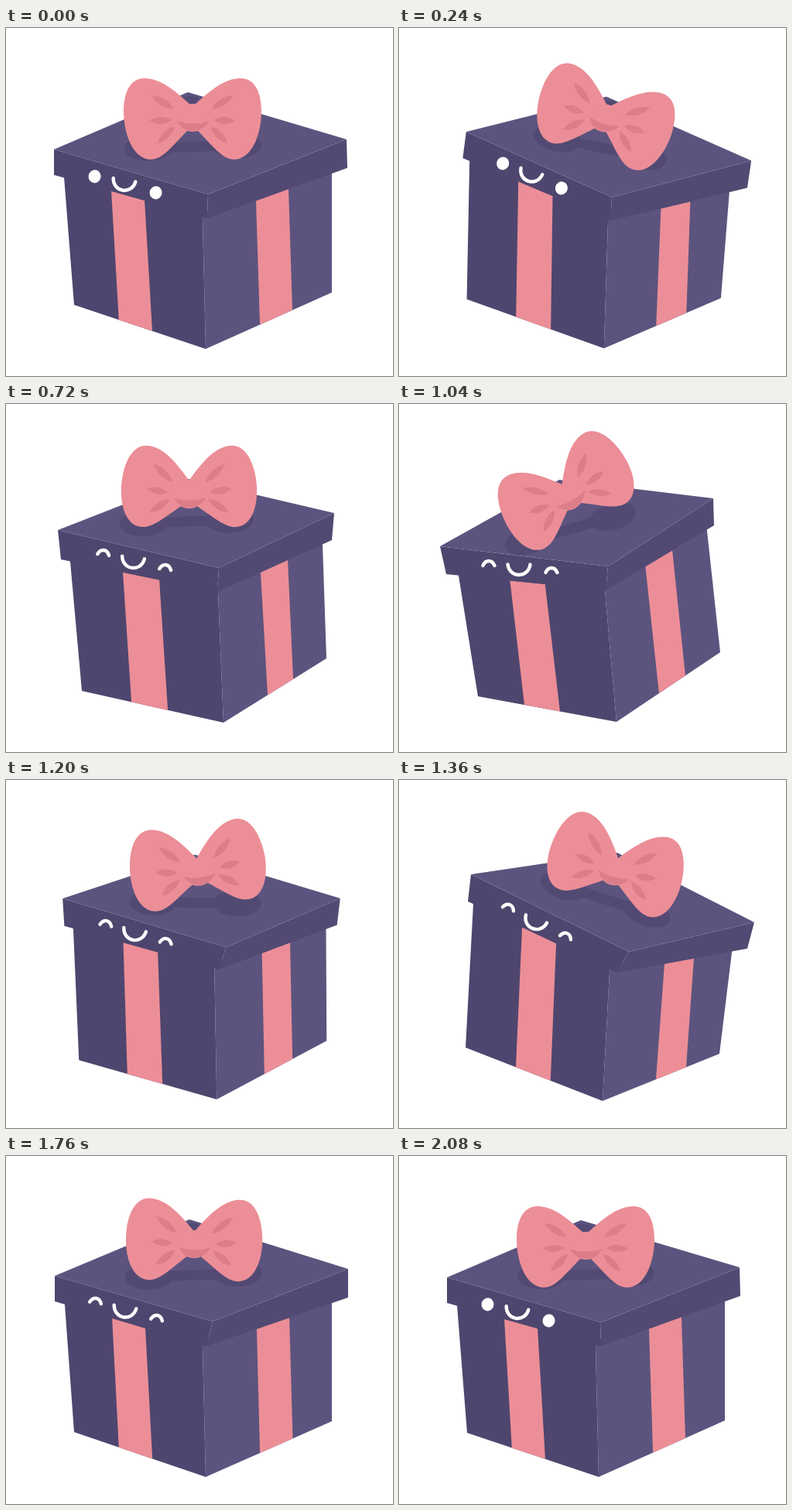
Animation, 500 px wide and 450 px high, one loop 2.4 s. Source, as an HTML page with a canvas:

```html
<!DOCTYPE html>
<html lang="en">
<head>
<meta charset="utf-8">
<title>Gift box</title>
<style>
  html, body { margin: 0; width: 100%; height: 100%; overflow: hidden; background: #fff; }
  canvas { display: block; }
</style>
</head>
<body>
<canvas id="stage" width="500" height="450"></canvas>
<script>
const ctx = document.getElementById('stage').getContext('2d');
const LOOP = 2400, STEP = 80, MOVE_END = 2080;
const SIDE = '#4e466e', FRONT = '#5c547e', RIM = '#524a73';
const PINK = '#ec8e97', FOLD = '#dc7d8a';

// body: top left, bottom left, bottom front, bottom right, top right, top front
// lid: left, back, right, front, then lower left, lower front, lower right
// left/right ribbon: percent along the lid edge (2) and the floor edge (2)
// face: both eyes; shade: both blobs; bow: knot x, y, tilt, raise in degrees
const rest = {
  at: 0,
  body: [75,193, 88,358, 258,415, 421,342, 421,190, 254,247],
  lid: [62,157, 235,83, 440,144, 261,215, 62,190, 260,246, 441,181],
  left: [37.4,59.1, 34,59.4], right: [34.8,58, 43,68.7],
  face: [115,189, 194,210], shade: [184,155, 299,152], bow: [241,116, 0,0]
};
const poses = [rest, {
  at: 480,
  body: [103,160, 90,350, 275,413, 411,350, 427,226, 285,250],
  lid: [103,122, 288,96, 460,187, 287,220, 97,158, 285,250, 450,221],
  left: [38.3,62.8, 37.3,62.7], right: [38.8,59.4, 45.6,71.3],
  face: [150,163, 224,201], shade: [215,135, 322,174], bow: [279,117, 29,7]
}, {
  at: 720,
  body: [83,204, 98,371, 281,412, 414,329, 409,182, 274,243],
  lid: [67,163, 236,97, 424,141, 275,212, 71,201, 273,243, 421,176],
  left: [39.6,62.9, 35,60.7], right: [37.8,61.5, 42.9,67.7],
  face: [126,192, 206,211], shade: [178,154, 289,150], bow: [236.5,117, 0,12]
}, {
  at: 1040,
  body: [77,222, 102,378, 281,411, 415,321, 398,164, 266,241],
  lid: [53,184, 207,98, 406,122, 270,210, 61,220, 267,241, 407,157],
  left: [40,62, 33.5,59.2], right: [36.7,61.5, 41,66.4],
  face: [116,206, 197,215], shade: [167,177, 276,146], bow: [219,119, -29,10]
}, {
  at: 1360,
  body: [96,160, 86,346, 263,415, 414,354, 430,223, 272,248],
  lid: [93,122, 282,94, 459,184, 297,222, 89,157, 282,249, 450,218],
  left: [36.3,59.1, 36.7,62], right: [36.3,58.9, 45.7,71.5],
  face: [142,164, 216,201], shade: [213,137, 321,172], bow: [278,118, 17,11]
}, {
  at: 1760,
  body: [76,193, 88,357, 258,415, 421,343, 421,192, 254,247],
  lid: [63,155, 237,82, 442,146, 267,214, 63,188, 259,246, 442,183],
  left: [37.8,59.7, 34,59.5], right: [35.5,58.5, 43,69],
  face: [116,187, 195,209], shade: [185,156, 300,152], bow: [243,114, 1,7]
}, { ...rest, at: MOVE_END }];

// Smooth curve through the poses, at rest on both ends
function slope(i, get) {
  const a = poses[i - 1], b = poses[i], c = poses[i + 1];
  if (!a || !c) return 0;
  const d1 = b.at - a.at, d2 = c.at - b.at;
  return ((get(b) - get(a)) / d1 * d2 + (get(c) - get(b)) / d2 * d1) / (d1 + d2);
}

function poseAt(t) {
  let i = 0;
  while (i < poses.length - 2 && t >= poses[i + 1].at) i++;
  const a = poses[i], b = poses[i + 1], span = b.at - a.at;
  const u = (t - a.at) / span, v = 1 - u;
  const pose = {};
  for (const part of Object.keys(rest)) {
    if (part === 'at') continue;
    pose[part] = rest[part].map((_, k) => {
      const get = p => p[part][k];
      return v * v * (1 + 2 * u) * get(a) + u * u * (3 - 2 * u) * get(b)
        + span * (u * v * v * slope(i, get) - u * u * v * slope(i + 1, get));
    });
  }
  return pose;
}

const mix = (p, q, k) => [p[0] + (q[0] - p[0]) * k, p[1] + (q[1] - p[1]) * k];
const points = list => list.flatMap((x, i) => i % 2 ? [] : [[x, list[i + 1]]]);
const angle = (p, q) => Math.atan2(q[1] - p[1], q[0] - p[0]);
const rad = deg => deg * Math.PI / 180;

function poly(color, ...corners) {
  ctx.fillStyle = color;
  ctx.beginPath();
  corners.forEach(p => ctx.lineTo(...p));
  ctx.fill();
}

function oval(color, x, y, rx, ry, turn = 0) {
  ctx.fillStyle = color;
  ctx.beginPath();
  ctx.ellipse(x, y, rx, ry, turn, 0, 7);
  ctx.fill();
}

function placed([x, y], turn, draw) {
  ctx.save();
  ctx.translate(x, y);
  ctx.rotate(turn);
  draw();
  ctx.restore();
}

function ribbon(p, q, r, s, k) {
  poly(PINK, mix(p, q, k[0] / 100), mix(p, q, k[1] / 100),
    mix(r, s, k[3] / 100), mix(r, s, k[2] / 100));
}

function drawBox(pose) {
  const [tl, bl, bf, br, tr, tf] = points(pose.body);
  const [l, b, r, f, l2, f2, r2] = points(pose.lid);
  const under = (low, top) => mix(low, top, 1.05);
  poly(FRONT, under(bf, tf), under(br, tr), br, bf);
  poly(SIDE, under(bl, tl), under(bf, tf), bf, bl);
  ribbon(l2, f2, bl, bf, pose.left);
  ribbon(f2, r2, bf, br, pose.right);
  poly(RIM, f, r, r2, f2);
  poly(SIDE, l, f, f2, l2);
  poly(FRONT, l, b, r, f);
  oval(RIM, b[0] + 2, b[1] + 10, 12, 5);

  const [s1, s2] = points(pose.shade), turn = angle(s1, s2);
  oval(RIM, ...s1, 31, 17, turn);
  oval(RIM, ...s2, 31, 17, turn);
  ctx.strokeStyle = RIM;
  ctx.lineWidth = 13;
  ctx.beginPath();
  ctx.moveTo(...s1);
  ctx.lineTo(...s2);
  ctx.stroke();
}

function drawFace(pose, t) {
  const [e1, e2] = points(pose.face), turn = angle(e1, e2) - rad(6);
  const open = t < 480 || t >= 2000, half = t === 480 || t === 1920;
  ctx.strokeStyle = ctx.fillStyle = '#fff';
  ctx.lineWidth = 4.4;
  ctx.lineCap = 'round';
  for (const eye of [e1, e2]) placed(eye, turn, () => {
    if (open) return oval('#fff', 0, 3, 8, 8.5);
    ctx.beginPath();
    if (half) {
      ctx.ellipse(0, 3, 8.3, 7.5, 0, Math.PI, 0);
      ctx.bezierCurveTo(8, 7, -8, 7, -8.3, 3);
      ctx.fill();
    } else {
      ctx.moveTo(-7.5, 3);
      ctx.bezierCurveTo(-4, -5, 4, -5, 7.5, 3);
      ctx.stroke();
    }
  });
  const [mx, my] = mix(e1, e2, 0.5);
  placed([mx - 1.5, my - 3], turn, () => {
    ctx.beginPath();
    ctx.moveTo(-14.5, 0);
    ctx.bezierCurveTo(-12, 18, 12, 18, 14.5, 0);
    ctx.stroke();
  });
  ctx.lineCap = 'butt';
}

const wing = new Path2D('M-4-18C-24-36-42-51-62-51C-82-51-89-30-89-8C-89 22-76 54-54 54C-38 54-26 36-6 16Z');
const crease = new Path2D('M-20 4Q0 11 22 4Q14 17 0 17Q-13 17-20 4Z');

function leaf(x, y, x2, y2) {
  const half = Math.hypot(x2 - x, y2 - y) / 2;
  placed([(x + x2) / 2, (y + y2) / 2], Math.atan2(y2 - y, x2 - x), () => {
    ctx.beginPath();
    ctx.moveTo(-half, 0);
    ctx.quadraticCurveTo(0, -9, half, 0);
    ctx.quadraticCurveTo(0, 9, -half, 0);
    ctx.fill();
  });
}

function drawBow([x, y, tilt, raise]) {
  placed([x, y], rad(tilt), () => {
    for (const side of [1, -1]) {
      ctx.save();
      ctx.scale(side, 1);
      ctx.rotate(rad(raise));
      ctx.fillStyle = PINK;
      ctx.fill(wing);
      ctx.fillStyle = FOLD;
      leaf(-53, -29, -24, -11);
      leaf(-55, 4, -27, 3);
      leaf(-45, 33, -23, 11);
      ctx.restore();
    }
    oval(PINK, 0, 0, 20, 18);
    ctx.fillStyle = FOLD;
    ctx.fill(crease);
  });
}

function frame(now) {
  const t = Math.min(Math.floor(now % LOOP / STEP) * STEP, MOVE_END);
  const pose = poseAt(t);
  ctx.fillStyle = '#fff';
  ctx.fillRect(0, 0, 500, 450);
  drawBox(pose);
  drawFace(pose, t);
  drawBow(pose.bow);
  requestAnimationFrame(frame);
}
frame(0);
</script>
</body>
</html>
```
